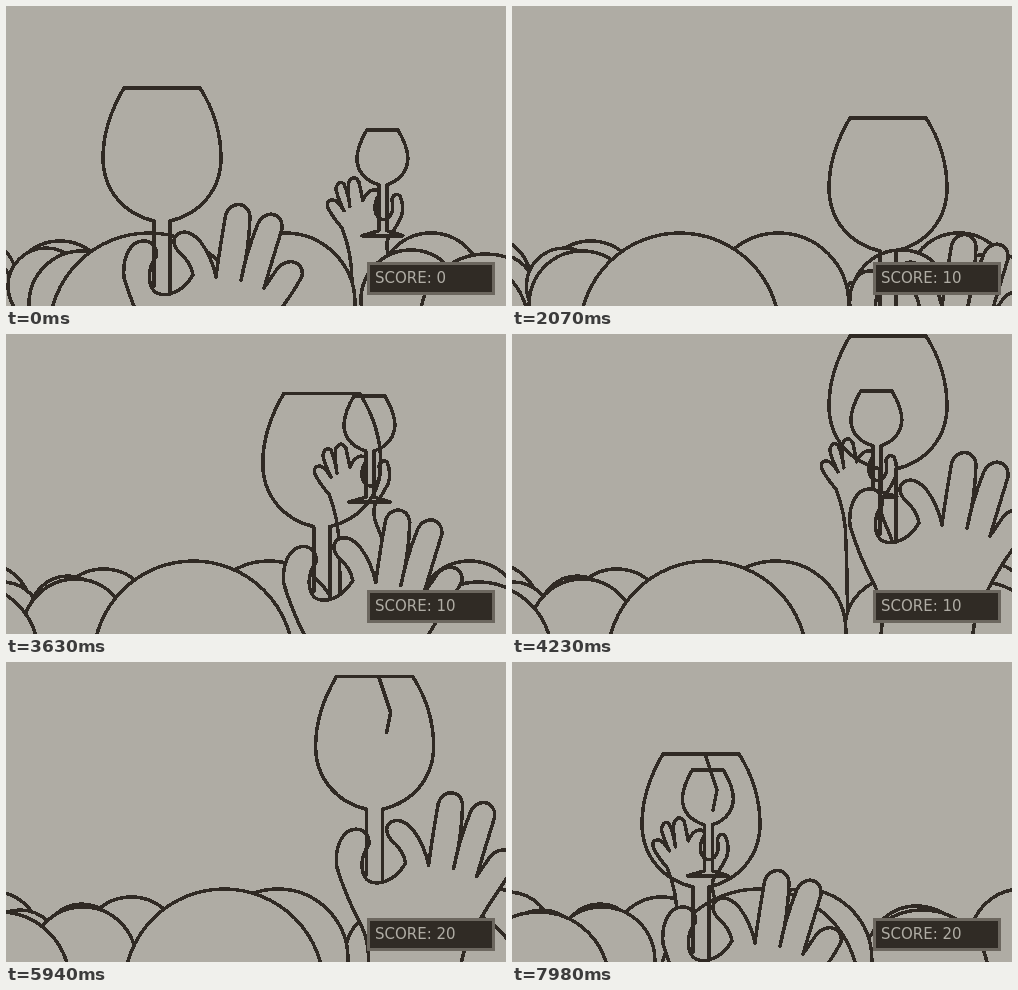
An HTML page that plays this animation: 500x300 px, repeating every 8 s.

```html
<!DOCTYPE html>
<html lang="en">
<head>
<meta charset="utf-8">
<title>Cheers</title>
<style>
  html, body { margin: 0; width: 100%; height: 100%; overflow: hidden; background: #afaca4; }
  svg { display: block; width: 100vw; height: 100vh; }
  path, circle {
    fill: #afaca4; stroke: #302a24; stroke-width: 3.5; shape-rendering: crispEdges;
    stroke-linecap: round; stroke-linejoin: round; vector-effect: non-scaling-stroke;
  }
  .clear { fill: none; }
  text { font: 15px "DejaVu Sans", sans-serif; fill: #afaca4; }
</style>
</head>
<body>
<svg viewBox="0 0 500 300">
  <g id="back"></g>

  <g id="guest">
    <path d="M-13 320 Q-13 190 -15 151 Q-15 123 -25 98 Q-34 88 -39 78 Q-41 70 -34 70 Q-29 71 -23 81
      Q-30 66 -31 59 Q-29 50 -23 54 Q-18 66 -17 77 Q-20 58 -18 52 Q-13 44 -8 52 L-4 71
      Q0 61 7 60 Q13 60 12 65 Q6 75 9 84 Q13 92 20 89 Q28 84 25 70
      Q27 62 33 66 Q38 77 34 88 Q29 98 21 109 Q18 119 24 132 Q34 155 44 188 Q54 215 64 250 L80 320"/>
    <path class="clear" d="M0 0 H31 Q41 17 41 29 Q40 48 20 55 V101 Q31 104 36 106 H-5 Q5 103 12 101 V55
      Q-10 48 -10 28 Q-9 15 0 0Z"/>
  </g>

  <g id="front"></g>

  <g id="player">
    <path d="M-91 523 Q-50 465 -18 409 Q5 360 18 330 Q32 310 32 285 Q32 264 25 250 Q9 220 0 190
      C-2 168 7 154 18 153 C29 152 34 162 32 169 C23 181 24 196 30 203 Q35 208 46 206
      Q60 202 69 187 Q67 174 54 163 Q46 152 54 146 Q64 140 76 153 Q88 169 92 189
      Q95 165 101 131 C103 112 125 112 126 129 Q125 162 117 192 Q122 166 133 138
      C139 120 160 124 158 141 Q149 170 140 200 L151 184 C161 167 181 173 178 188
      Q173 198 164 211 Q140 245 127 277 Q120 300 123 330 Q140 368 158 400 Q177 440 189 479 L202 523"/>
    <path class="clear" d="M30 198 V133 C0 126 -21 102 -21 70 C-21 45 -13 22 0 0 H76
      C90 22 97 45 97 70 C97 102 76 126 46 133 V203"/>
    <path class="clear" id="crack" d="M42 0 L54 36 L50 56"/>
  </g>

  <rect x="362.5" y="257.5" width="125" height="30" fill="#302b25" stroke="#6c675f" stroke-width="3"/>
  <text id="score" x="369" y="277"></text>
</svg>
<script>
const LOOP = 8000;
const byId = id => document.getElementById(id);
const clamp = v => Math.min(1, Math.max(0, v));
const progress = (t, from, to) => clamp((t - from) / (to - from));

// Each head drifts steadily; sway bends its path mid-loop.
const head = (r, top, x, drift, sway = 0) => ({ r, top, x, drift, sway });
const backHeads = [
  head(45, 230, -34, 30), head(50, 235, 54, 96), head(40, 248, -32, 62),
  head(38, 242, 40, 48), head(53, 245, 76, 14, 13), head(52, 227, 425, 85)
];
const frontHeads = [
  head(50, 244, 405, 0, 22), head(66, 248, 480, -70, -25), head(70, 227, 279, 11, 21),
  head(70, 250, -70, 97, 12), head(100, 227, 143, 104, 3)
];

// A guest rises, bobs in place and sinks again.
const guests = [
  { rise: -600, sink: 1500, x: 358, y: 119, phase: 2.1 },
  { rise: 2000, sink: 5400, x: 343, y: 53.5, phase: -0.7 },
  { rise: 7100, sink: LOOP, x: 181, y: 114, phase: -0.7 }
];

const moves = [
  { from: 60, to: 840, x: 376, y: 112 },
  { from: 2300, to: 2900, x: 261, y: 112 },
  { from: 3250, to: 4050, x: 376, y: 2 },
  { from: 5700, to: 6680, x: 346, y: 52 },
  { from: 7380, to: 7980, x: 189, y: 92 }
];
const clinks = [1350, 5200];

function guestAt(t) {
  const g = guests.findLast(({ rise }) => t >= rise);
  const angle = 2 * Math.PI * (t - 3645) / 3150;
  const hidden = 1 - progress(t, g.rise, g.rise + 500) + progress(t, g.sink, g.sink + 400);
  return [g.x + 6.6 * Math.cos(angle + g.phase), g.y + 8.6 * Math.cos(angle) + 270 * hidden];
}

function playerAt(t) {
  let x = 156, y = 82, scale = 1;
  for (const m of moves) {
    const k = progress(t, m.from, m.to);
    x += (m.x - x) * k;
    y += (m.y - y) * k;
  }
  for (const hit of clinks) {
    scale -= 0.43 * (progress(t, hit - 200, hit) - progress(t, hit + 100, hit + 350));
  }
  return { x, y, scale };
}

function addHeads(heads, parent) {
  for (const h of heads) {
    h.node = document.createElementNS(parent.namespaceURI, "circle");
    h.node.setAttribute("r", h.r);
    h.node.setAttribute("cy", h.top + h.r);
    parent.append(h.node);
  }
}

addHeads(backHeads, byId("back"));
addHeads(frontHeads, byId("front"));
const crowd = [...backHeads, ...frontHeads];
const guest = byId("guest"), player = byId("player");
const crack = byId("crack"), score = byId("score");
const start = performance.now();

function draw(now) {
  const t = Math.max(0, now - start) % LOOP;
  const k = t / LOOP;
  for (const { node, x, drift, sway } of crowd) {
    node.setAttribute("cx", x + drift * k - sway * Math.sin(Math.PI * k));
  }
  guest.setAttribute("transform", `translate(${guestAt(t)})`);
  const { x, y, scale } = playerAt(t);
  player.setAttribute("transform", `translate(${x} ${y}) scale(${scale}) translate(-38 0)`);
  const hits = clinks.filter(hit => t >= hit + 50).length;
  crack.setAttribute("visibility", hits > 1 ? "visible" : "hidden");
  score.textContent = "SCORE: " + 10 * hits;
  requestAnimationFrame(draw);
}
draw(start);
</script>
</body>
</html>
```
